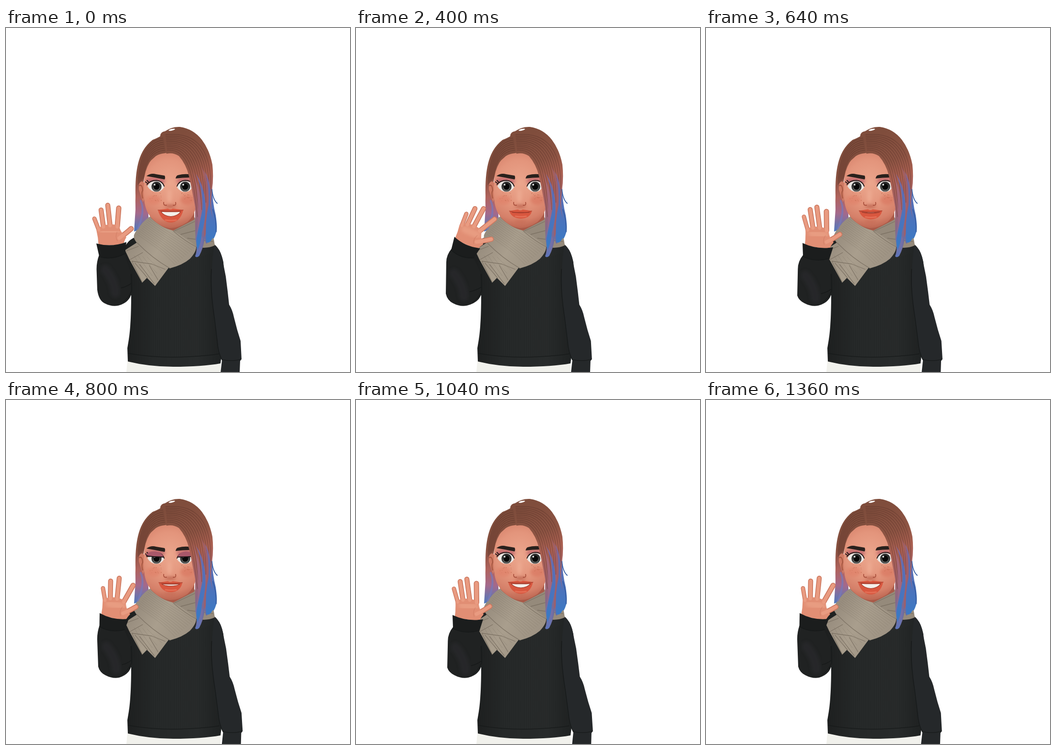
Animation of 720 by 720 pixels, one loop 1440 ms. Source, as an HTML page:

```html
<!DOCTYPE html>
<html lang="en">
<head>
<meta charset="utf-8">
<title>Waving avatar</title>
<style>
html, body { margin: 0; width: 100%; height: 100%; overflow: hidden; background: #fff; }
svg { display: block; width: 100%; height: 100%; }
path, line { stroke-linecap: round; stroke-linejoin: round; }
.fold { fill: none; stroke: #746a5d; stroke-width: 1.3; opacity: .75; }
.crease { fill: none; stroke: #151717; stroke-width: 1.6; opacity: .7; }
</style>
</head>
<body>
<svg viewBox="0 0 720 720">
<defs>
  <radialGradient id="skin" gradientUnits="userSpaceOnUse" cx="342" cy="325" r="96">
    <stop offset="0" stop-color="#eba68d"/><stop offset=".5" stop-color="#e3957c"/>
    <stop offset=".8" stop-color="#d58069"/><stop offset="1" stop-color="#b9634f"/>
  </radialGradient>
  <linearGradient id="hair" gradientUnits="userSpaceOnUse" x1="330" y1="235" x2="420" y2="440">
    <stop offset="0" stop-color="#7f4d3c"/><stop offset=".28" stop-color="#8d5443"/>
    <stop offset=".45" stop-color="#a95f50"/><stop offset=".72" stop-color="#a4636d"/>
    <stop offset="1" stop-color="#6f6c9d"/>
  </linearGradient>
  <linearGradient id="hairLeft" gradientUnits="userSpaceOnUse" x1="0" y1="240" x2="0" y2="424">
    <stop offset="0" stop-color="#7d4c3b"/><stop offset=".4" stop-color="#87503f"/>
    <stop offset=".62" stop-color="#b0635c"/><stop offset=".8" stop-color="#a5698a"/>
    <stop offset="1" stop-color="#5178bb"/>
  </linearGradient>
  <linearGradient id="dye" gradientUnits="userSpaceOnUse" x1="0" y1="290" x2="0" y2="450">
    <stop offset="0" stop-color="#a0617c"/><stop offset=".35" stop-color="#5c6db4"/>
    <stop offset="1" stop-color="#3b79c4"/>
  </linearGradient>
  <linearGradient id="lilac" gradientUnits="userSpaceOnUse" x1="0" y1="300" x2="0" y2="480">
    <stop offset="0" stop-color="#a86873"/><stop offset=".5" stop-color="#a3677e"/>
    <stop offset="1" stop-color="#5c75bb"/>
  </linearGradient>
  <linearGradient id="knit" gradientUnits="userSpaceOnUse" x1="250" y1="0" x2="450" y2="0">
    <stop offset="0" stop-color="#1d1f1f"/><stop offset=".3" stop-color="#262929"/>
    <stop offset=".75" stop-color="#282b2b"/><stop offset="1" stop-color="#1f2222"/>
  </linearGradient>
  <linearGradient id="wool" gradientUnits="userSpaceOnUse" x1="265" y1="420" x2="395" y2="500">
    <stop offset="0" stop-color="#93887a"/><stop offset=".45" stop-color="#a99e8d"/>
    <stop offset="1" stop-color="#9a8f80"/>
  </linearGradient>
  <pattern id="rib" width="4" height="6" patternUnits="userSpaceOnUse">
    <path d="M1 0V6" stroke="#151717" stroke-width="1" opacity=".3"/>
  </pattern>
  <filter id="soft" x="-50%" y="-50%" width="200%" height="200%"><feGaussianBlur stdDeviation="3"/></filter>
  <clipPath id="eyes">
    <path id="eyeL" d="M296 331Q301 320 315 320Q328 321 331 333Q326 343 314 343Q302 342 296 331Z"/>
    <path id="eyeR" d="M358 333Q361 321 375 320Q387 320 391 331Q387 342 376 343Q363 343 358 333Z"/>
  </clipPath>
</defs>

<!-- hair behind the neck -->
<path fill="url(#hairLeft)" d="M274 300Q270 345 271 380L268 426L300 416L294 340Z"/>
<path fill="url(#dye)" d="M400 320L431 330Q432 365 439 392Q443 420 440 428Q436 442 427 451L405 448Z"/>

<!-- clothes -->
<path fill="#f1f1ec" d="M254 698L252 720H449V702Z"/>
<g id="torso">
  <path fill="url(#knit)" d="M272 437Q248 447 246 470L249 545L262 560Q262 620 257 652L254 670L255 698Q300 709 350 709Q410 709 449 702L462 600L455 490Q449 463 436 453L390 440Z"/>
  <path fill="url(#rib)" d="M262 500L262 560Q262 620 257 652L256 680Q350 698 446 682L436 620L432 470L340 500Z"/>
  <path class="crease" d="M256 681Q300 689 350 689Q410 688 446 682"/>
</g>
<g id="sleeve">
  <path fill="#25282a" d="M436 453Q448 463 452 479L460 520L464 552L467 579Q474 590 477 605L484 632L491 655L493 693L490 697L489 722H449L452 696Q445 684 442 654L436 605Q424 540 436 453Z"/>
  <path class="crease" d="M430 505Q427 545 436 605L442 654Q444 680 452 694Q474 699 492 693"/>
</g>

<!-- scarf -->
<g fill="url(#wool)">
  <path fill="#958a7b" d="M340 424L392 394L412 414L435 442L437 455Q420 463 398 458Z"/>
  <path class="fold" d="M352 425L395 405M366 432L412 420M380 440L433 447"/>
  <path d="M274 449L249 465L258 484L285 533L295 523L312 540L341 501L306 474Z"/>
  <path class="fold" d="M251 467L277 457M259 485L286 470M264 489L285 532M263 488L305 494L333 505M270 492L296 523M280 495L310 535M300 497L318 527"/>
  <path d="M302 394Q283 407 273 424Q266 433 268 440Q274 454 296 472Q318 490 343 503Q370 496 385 483Q399 468 398 457Q382 443 350 424Q320 414 302 394Z"/>
  <path class="fold" d="M274 449Q306 482 343 503M350 425Q376 447 398 458"/>
  <g id="weave" fill="none" stroke="#7c7264" stroke-width="1" opacity=".35"></g>
</g>

<!-- head -->
<path fill="#a95a48" d="M300 385L304 398Q324 418 350 424L394 401V380Z"/>
<ellipse cx="283" cy="342" rx="9" ry="24" fill="#cf7a63"/>
<path d="M279 330Q285 326 286 340Q283 345 286 356" fill="none" stroke="#a4553f" stroke-width="2"/>
<path fill="url(#skin)" d="M290 305Q296 250 343 252Q386 258 399 330L398 372Q394 394 380 406Q361 419 343 419Q324 417 309 402Q294 389 290 366L288 345Z"/>
<g filter="url(#soft)">
  <ellipse cx="313" cy="320" rx="20" ry="8" fill="#b85c6a" opacity=".75"/>
  <ellipse cx="376" cy="320" rx="19" ry="8" fill="#b85c6a" opacity=".7"/>
  <ellipse cx="309" cy="360" rx="15" ry="10" fill="#df8068" opacity=".7"/>
  <ellipse cx="379" cy="360" rx="14" ry="10" fill="#d9765f" opacity=".7"/>
  <ellipse cx="344" cy="373" rx="12" ry="3" fill="#a94b37" opacity=".7"/>
  <ellipse cx="342" cy="352" rx="5" ry="14" fill="#f0ae96" opacity=".7"/>
  <ellipse cx="344" cy="405" rx="14" ry="4" fill="#bd5f49" opacity=".4"/>
</g>
<path d="M330 365Q329 372 336 371M355 365Q357 372 350 371" fill="none" stroke="#a84f3c" stroke-width="1.8"/>
<g id="freckles" fill="#b45f42" opacity=".65"></g>

<g clip-path="url(#eyes)">
  <path d="M290 315H396V348H290Z" fill="#e9e6e2"/>
  <g id="irises"></g>
  <path d="M294 318Q314 316 333 326V319H356V326Q375 316 393 320V314H294Z" fill="#6b4945" opacity=".45"/>
</g>
<path d="M295 328Q301 319 315 319Q327 320 331 331M358 331Q362 320 375 319Q387 319 391 327M297 326L292 322M299 323L295 319" fill="none" stroke="#261b1b" stroke-width="2"/>
<g id="lids"></g>
<g fill="#29211d">
  <path id="browL" d="M294 310Q303 303 314 306L332 309Q334 313 332 317Q313 313 294 310Z"/>
  <path id="browR" d="M355 315Q356 309 360 308Q371 305 382 306L384 313Q370 313 355 315Z"/>
</g>
<g id="mouth"></g>

<!-- front hair -->
<path fill="url(#hairLeft)" d="M333 262Q310 264 300 282Q291 297 288 322Q277 318 278 338L286 362L292 398Q284 412 269 425Q273 390 271 350Q270 305 278 278Q286 250 307 234L326 227Z"/>
<path fill="url(#hair)" d="M323 229Q321 218 333 216Q348 206 364 207Q392 211 410 234Q426 255 432 286Q435 315 431 340Q427 370 432 395Q434 425 421 451Q417 453 416 440Q412 465 404 477Q398 481 396 477Q401 465 397 443Q395 405 396 375Q389 337 383 310Q377 285 362 268Q350 260 336 263Q331 254 323 229Z"/>
<path fill="url(#hairLeft)" d="M335 262Q322 258 307 274Q293 285 289 313L275 318Q274 270 307 235L328 224Q332 240 335 262Z"/>
<ellipse cx="347" cy="213" rx="7" ry="1.7" transform="rotate(-13 347 213)" fill="#fff"/>
<g id="strands" fill="none" stroke="#4d2a23" stroke-width="1.3" opacity=".38"></g>
<path fill="url(#lilac)" d="M388 295Q400 320 401 360Q405 410 396 441Q404 465 396 478Q400 482 405 476Q412 458 412 441Q405 430 409 394Q410 340 388 295Z"/>
<path fill="url(#dye)" d="M397 305Q413 340 411 380Q404 415 401 428Q396 450 401 465Q409 448 410 428Q421 390 416 355Q411 323 397 305Z"/>
<path fill="#9e5f6a" d="M409 290Q422 330 420 375Q415 404 414 438Q420 431 422 410Q428 370 425 340Q420 310 409 290Z"/>
<path fill="url(#dye)" d="M416 300Q426 335 424 370Q416 405 419 448Q426 453 433 439Q439 424 431 392Q425 366 428 340Q425 315 416 300Z"/>
<path d="M431 338Q433 359 442 367M433 380Q441 404 440 426" fill="none" stroke="#355ca0" stroke-width="1.8"/>
<path d="M282 362Q292 383 276 420" fill="none" stroke="#7779b8" stroke-width="4" opacity=".75"/>

<!-- waving arm -->
<g id="arm"></g>
</svg>
<script>
const $ = id => document.getElementById(id);
const mix = (a, b, k) => a + (b - a) * k;
const blend = (a, b, k) => a.map((v, i) => mix(v, b[i], k));
const path = (d, attrs) => `<path d="${d}" ${attrs}/>`;

// cuff left x,y, right x,y | elbow x,y | tips: pinky, ring, middle, index, thumb
const poses = {
  open:   [189,451, 252,448, 191,548, 185,399, 199,381, 213,371, 236,377, 262,420],
  right:  [210,447, 272,462, 192,556, 215,398, 231,384, 244,377, 262,386, 289,437],
  far:    [211,441, 268,463, 190,556, 225,394, 242,380, 259,376, 279,391, 290,440],
  fan:    [206,437, 260,461, 188,556, 231,389, 249,378, 267,378, 290,400, 283,442],
  middle: [202,450, 266,459, 191,560, 205,395, 218,380, 232,375, 252,384, 280,432],
  back:   [196,446, 257,458, 193,558, 203,394, 219,379, 237,373, 266,388, 272,433],
  left:   [187,456, 249,444, 199,556, 179,402, 190,380, 208,370, 227,372, 249,411],
  edge:   [183,460, 245,445, 200,556, 171,408, 181,385, 199,374, 219,374, 242,412]
};
const wave = [
  [0, 'open'], [110, 'left'], [170, 'middle'], [240, 'right'], [320, 'far'], [400, 'fan'],
  [480, 'back'], [560, 'open'], [640, 'middle'], [720, 'right'], [800, 'back'], [880, 'left'],
  [960, 'edge'], [1040, 'middle'], [1120, 'right'], [1200, 'far'], [1280, 'fan'],
  [1360, 'back'], [1440, 'open']
].map(([t, name]) => [t, poses[name]]);
const smile = [[0, [1]], [240, [0]], [560, [0]], [640, [.2]], [880, [.5]], [1120, [1]], [1440, [1]]];
const blink = [[0, [0]], [720, [0]], [800, [.5]], [880, [1]], [960, [.5]], [1040, [0]], [1440, [0]]];
const sway = [[0, [0]], [240, [0]], [640, [2]], [1120, [3]], [1440, [0]]];

function at(keys, t) {
  let i = 1;
  while (i < keys.length - 1 && keys[i][0] < t) i++;
  const [t0, a] = keys[i - 1], [t1, b] = keys[i];
  return blend(a, b, (t - t0) / (t1 - t0));
}

function drawArm(p) {
  const [lx, ly, rx, ry, ex, ey] = p;
  const len = Math.hypot(rx - lx, ry - ly);
  const ux = (rx - lx) / len, uy = (ry - ly) / len;
  const mx = (lx + rx) / 2, my = (ly + ry) / 2;
  // point in the frame of the cuff: u along it, v towards the fingers
  const pt = (u, v) => [mx + u * ux + v * uy, my + u * uy - v * ux];
  const s = (u, v) => pt(u, v).map(n => n.toFixed(1)).join(' ');
  const roots = [[-25, 28], [-15, 34], [-1, 36], [14, 33]];
  const widths = [9, 10.5, 10.5, 11];
  const fingers = roots.map(([u, v], i) =>
    ({ d: `M${s(u, v)}L${p[6 + 2 * i]} ${p[7 + 2 * i]}`, w: widths[i] }));
  fingers.push({ d: `M${s(17, 9)}Q${s(27, 15)} ${p[14]} ${p[15]}`, w: 11 });
  const stroke = (color, k) => fingers.map(f =>
    path(f.d, `fill="none" stroke="${color}" stroke-width="${f.w * k}"`)).join('');
  const palm = `M${s(-27, -4)}Q${s(-27, 12)} ${s(-30, 28)}L${s(-18, 37)}L${s(0, 39)}L${s(18, 36)}` +
    `Q${s(19, 25)} ${s(24, 19)}L${s(32, 10)}Q${s(27, 3)} ${s(25, -6)}Z`;
  const half = len / 2;
  const [bx, by] = pt(-half + 5, -28);
  const hx = mix(bx, ex, .65) - 3;
  const sleeve = `M${s(-half + 5, -24)}Q${hx} ${by + 10} ${hx} ${by + 26}L${ex} ${ey}` +
    `Q${ex + 3} 570 ${ex + 15} 576Q${ex + 30} 584 ${ex + 44} 581Q260 574 263 553L262 515L${s(half - 6, -22)}Z`;
  const cuff = `M${s(-half, 0)}Q${s(0, -10)} ${s(half, 0)}L${s(half - 4, -24)}` +
    `Q${s(0, -37)} ${s(-half + 5, -28)}Z`;
  $('arm').innerHTML =
    path(sleeve, 'fill="#202222"') +
    path(`M${ex + 17} ${ey - 42}Q${ex + 36} ${ey - 20} ${ex + 38} ${ey + 6}`,
      'fill="none" stroke="#2a2c2d" stroke-width="20" opacity=".6" filter="url(#soft)"') +
    path(`M262 515L263 550Q256 566 244 574M${ex + 50} ${ey - 4}Q${ex + 61} ${ey - 6} 263 ${ey - 14}`, 'class="crease"') +
    stroke('#cd7960', 1) + path(palm, 'fill="#e18e74"') + stroke('#e99b81', .68) +
    path(`M${s(-16, 23)}L${s(12, 23)}`, 'fill="none" stroke="#eca489" stroke-width="15" opacity=".65" filter="url(#soft)"') +
    path(`M${s(13, 22)}Q${s(8, 12)} ${s(13, 3)}`, 'fill="none" stroke="#c9755d" stroke-width="1.2" opacity=".5"') +
    path(cuff, 'fill="#1b1d1d"') +
    path(`M${s(-half + 5, -28)}Q${s(0, -37)} ${s(half - 4, -24)}`, 'class="crease"');
}

function drawMouth(k) {
  const cl = mix(321, 318, k), cr = mix(368, 371, k);
  const cy = mix(383, 381, k), top = mix(380, 378, k), low = mix(399, 407, k);
  const teethTop = mix(386, 384, k), gap = 16 * k;
  const lips = `M${cl} ${cy}Q332 ${top + 1} 339 ${top}Q344 ${top + 3} 349 ${top}Q358 ${top + 1} ${cr} ${cy}` +
    `Q365 ${low - 1} 345 ${low}Q325 ${low - 1} ${cl} ${cy}Z`;
  const l = cl + 6, r = cr - 5;
  const inner = `M${l} ${teethTop}Q345 ${teethTop + 1} ${r} ${teethTop}` +
    `Q${r - 6} ${teethTop + gap / 1.7} 345 ${teethTop + gap / 1.5}Q${l + 6} ${teethTop + gap / 1.7} ${l} ${teethTop}Z`;
  $('mouth').innerHTML = path(lips, 'fill="#d9573f"') +
    path(`M334 ${low - 5}Q345 ${low - 3} 356 ${low - 5}`, 'fill="none" stroke="#ea7b61" stroke-width="3" opacity=".65"') +
    path(inner, `fill="${k > .1 ? '#f4f0ea' : '#a43d2d'}" stroke="#a43d2d" stroke-width="1.3"`) +
    path(`M${cl} ${cy}Q345 ${mix(391, teethTop + 1, Math.min(1, k * 3))} ${cr} ${cy}`,
      'fill="none" stroke="#a43d2d" stroke-width="1.2"');
}

function drawLids(k) {
  const edge = mix(320, 337, k), mid = mix(319, 339, k);
  $('lids').innerHTML = k < .02 ? '' :
    (k > .9 ? path('M294 331Q313 317 333 332Q329 345 313 345Q299 344 294 331ZM356 332Q374 317 392 330Q390 344 375 345Q360 344 356 332Z', 'fill="#d98b75"') : '') +
    path(`M292 326Q297 316 314 317Q327 319 332 332L330 ${edge}Q313 ${mid} 295 ${edge - 2}Z` +
      `M357 332Q362 318 377 317Q389 317 392 327L391 ${edge - 1}Q375 ${mid} 359 ${edge}Z`, 'fill="#a9586a"') +
    path(`M295 ${edge - 2}Q313 ${mid} 330 ${edge}M359 ${edge}Q375 ${mid} 391 ${edge - 1}M299 ${edge - 1}L294 ${edge - 3}`,
      'fill="none" stroke="#1d1518" stroke-width="2.2"');
  $('browL').setAttribute('transform', `translate(0 ${2 * k})`);
  $('browR').setAttribute('transform', `translate(0 ${2 * k})`);
}

function strands(a, b, n) {
  let out = '';
  for (let i = 1; i < n; i++) {
    const c = blend(a, b, i / n).map(v => v.toFixed(1));
    out += path(`M${c[0]} ${c[1]}C${c.slice(2).join(' ')}`, '');
  }
  return out;
}

function build() {
  $('strands').innerHTML =
    strands([338,259, 380,258, 386,310, 398,400], [334,220, 432,208, 436,300, 430,345], 11) +
    strands([333,260, 304,262, 293,286, 290,312], [328,226, 289,232, 276,275, 274,330], 8);
  $('weave').innerHTML =
    strands([272,435, 300,455, 325,470, 350,499], [302,396, 330,418, 368,438, 397,458], 12) +
    strands([259,475, 270,497, 276,510, 286,529], [304,480, 311,485, 325,495, 336,503], 5);
  let seed = 7, dots = '';
  const rnd = () => (seed = seed * 16807 % 2147483647) / 2147483647;
  rnd(); rnd();
  for (let i = 0; i < 34; i++) {
    const x = (i % 2 ? 300 : 364) + rnd() * 27, y = 345 + rnd() * 18;
    dots += `<circle cx="${x.toFixed(1)}" cy="${y.toFixed(1)}" r="${(.45 + rnd() * .45).toFixed(2)}"/>`;
  }
  $('freckles').innerHTML = dots;
  $('irises').innerHTML = [315, 375].map(x =>
    `<circle cx="${x}" cy="332" r="10.5" fill="#2c2d2d"/>
     <circle cx="${x}" cy="334" r="8" fill="#555856"/>
     <circle cx="${x}" cy="332" r="6.5" fill="#080808"/>
     <circle cx="${x - 4}" cy="328" r="1.8" fill="#fff"/>`).join('');
}

function draw(ms) {
  const t = Math.floor(ms % 1440 / 80) * 80;
  drawArm(at(wave, t));
  drawMouth(at(smile, t)[0]);
  drawLids(at(blink, t)[0]);
  // the hanging sleeve drifts outwards from a fixed shoulder
  const k = at(sway, t)[0] / 240;
  $('sleeve').setAttribute('transform', `matrix(1 0 ${k} 1 ${-453 * k} 0)`);
}

build();
const start = performance.now();
function loop() {
  draw(performance.now() - start);
  requestAnimationFrame(loop);
}
loop();
</script>
</body>
</html>
```
